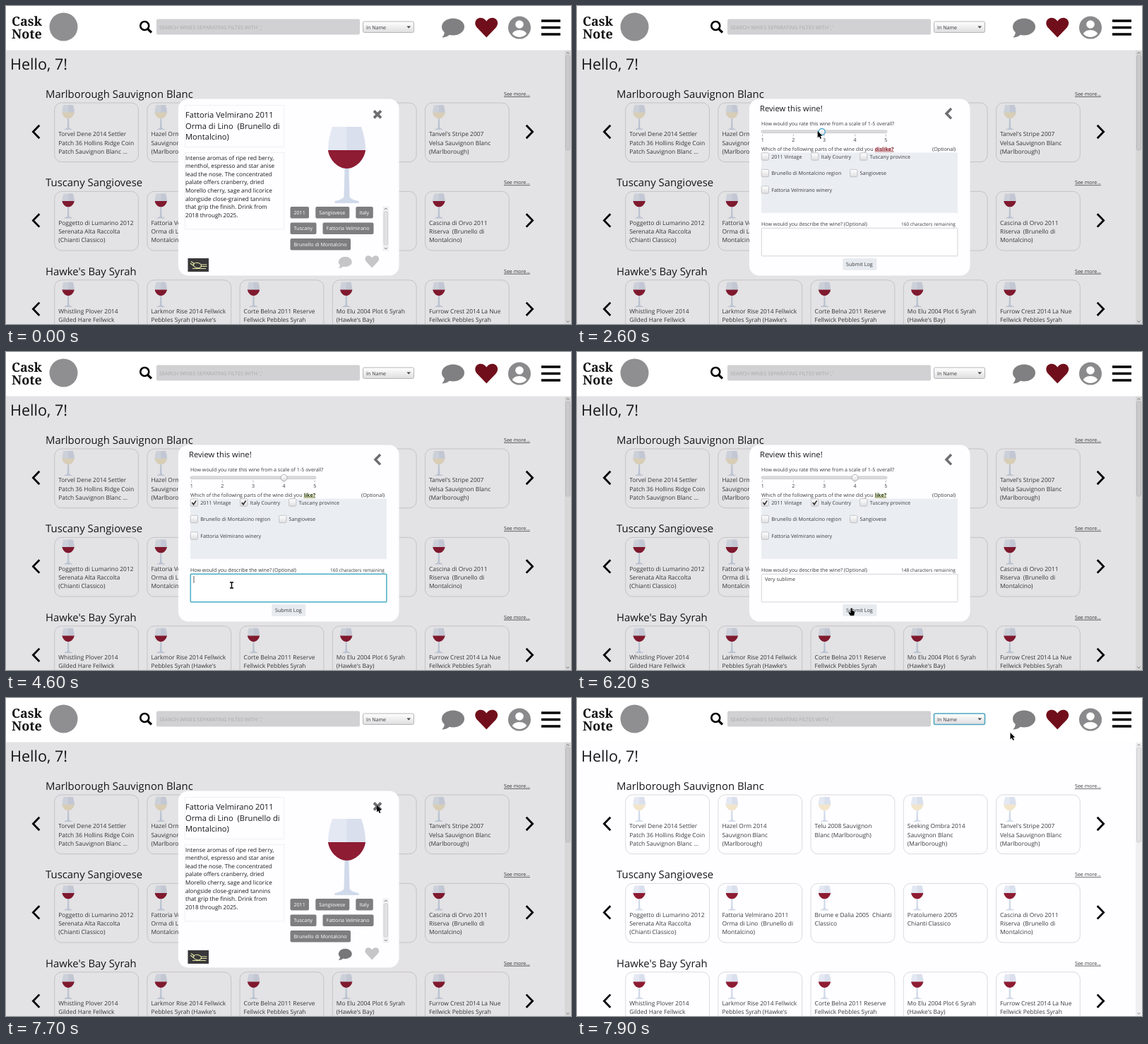
These frames come from a looping animation (800x450 px, 8000 ms). An HTML page:

```html
<!DOCTYPE html>
<html lang="en">
<head>
<meta charset="utf-8">
<title>Wine review</title>
<style>
html, body { margin: 0; width: 100%; height: 100%; overflow: hidden; background: #fefdff; }
svg { display: block; width: 800px; height: 450px; }
text { font-family: "Open Sans", "Noto Sans", sans-serif; fill: #3a3a3d; white-space: pre; text-rendering: geometricPrecision; }
.dark { fill: #18181a; }
.line { fill: none; stroke-linejoin: miter; }
</style>
</head>
<body>
<svg id="stage" viewBox="0 0 800 450"></svg>
<script>
const LOOP = 8000, STEP = 100;
const OPEN = 1000, SUBMIT = 6400, CLOSE = 7800;
const NOTE = 'Very sublime';

const text = (x, y, size, str, attrs = '') =>
  `<text x="${x}" y="${y}" font-size="${size}" ${attrs}>${str}</text>`;
const lines = (x, y, size, gap, list, attrs) =>
  list.map((s, i) => text(x, y + i * gap, size, s, attrs)).join('');
const rect = (x, y, w, h, fill, attrs = '') =>
  `<rect x="${x}" y="${y}" width="${w}" height="${h}" fill="${fill}" ${attrs}/>`;
const line = (d, stroke, width, attrs = '') =>
  `<path class="line" d="${d}" stroke="${stroke}" stroke-width="${width}" ${attrs}/>`;
const shape = (d, fill, attrs = '') => `<path d="${d}" fill="${fill}" ${attrs}/>`;
const use = (id, x, y, scale = 1, attrs = '') =>
  `<use href="#${id}" transform="translate(${x} ${y}) scale(${scale})" ${attrs}/>`;
const DARK = 'class="dark"';

// Glass origin is the middle of its rim.
const glass = (id, wine) => `<g id="${id}">
  ${shape('M-20.5 0H20.5Q26.5 18 26.5 33C25 46 13 59 0 59C-13 59 -25 46 -26.5 33Q-26.5 18 -20.5 0Z', '#e3e8f3')}
  ${shape('M0 0H20.5Q26.5 18 26.5 33H0Z', '#d9dfec')}
  ${shape('M-26.5 33H26.5C25 46 13 59 0 59C-13 59 -25 46 -26.5 33Z', wine)}
  ${shape('M-3 59H3L4 99Q6 103 17 105V108H-17V105Q-6 103 -4 99Z', '#d0daea')}</g>`;

const defs = `<defs>
  <linearGradient id="button" x2="0" y2="1"><stop stop-color="#fff"/><stop offset="1" stop-color="#dedee0"/></linearGradient>
  <clipPath id="disc"><circle cx="727" cy="31" r="13"/></clipPath>
  ${glass('white', '#f2e5ca')}${glass('red', '#8e1c33')}
  <g id="chat"><ellipse cy="-1" rx="16" ry="12"/><path d="M-12 5Q-12 11 -16 14Q-8 14 -4 9Z"/></g>
  <path id="heart" d="M0 14L-13 0.5C-22 -10 -8 -20 0 -9C8 -20 22 -10 13 0.5Z"/>
  <path id="arrow" d="M0 0V9.5L2.2 7.5L3.8 11L5.4 10.3L3.8 6.8H6.7Z"/>
  <path id="beam" class="line" d="M-2.5 -4H2.5M0 -4V4M-2.5 4H2.5" stroke="#000" stroke-width="1.4"/>
  <path id="hand" d="M-1 -5Q0 -6.5 1 -5V-2L4 -1Q5 -.5 4.6 1L3.6 5H-1.5L-4 1Q-4 -.5 -2.6 .3L-1 1.5Z"/>
</defs>`;

const header = rect(0, 0, 800, 62.5, '#fff') +
  lines(8, 27.5, 18, 18.5, ['Cask', 'Note'], 'style="font-family:\'Noto Serif\',serif;font-weight:900;fill:#111"') +
  '<circle cx="81.5" cy="29.5" r="20" fill="#8f8f91"/>' +
  '<circle cx="196.3" cy="28" r="6" fill="none" stroke="#000" stroke-width="2.6"/>' + line('M200.5 32.3L206 37.5', '#000', 3.2) +
  rect(213, 18.5, 288, 22, '#d1d0d2', 'rx="2"') +
  text(217, 32.5, 7.3, "SEARCH WINES SEPARATING FILTES WITH ','", 'style="fill:#aaa9ab"') +
  rect(505.5, 22, 72, 15.5, 'url(#button)', 'id="combo" rx="2"') +
  text(510, 32.5, 7.1, 'In Name') + shape('M567.5 28.5H573L570.2 31.5Z', '#444') +
  use('chat', 633, 30.4, 1, 'fill="#808082"') +
  use('heart', 680.3, 30.6, 1, 'fill="#700f1b"') +
  '<circle cx="727" cy="30.6" r="16" fill="#8a8a8c"/><g clip-path="url(#disc)" fill="#fff">' +
  '<circle cx="727" cy="26" r="5.8"/><ellipse cx="727" cy="42" rx="11" ry="8"/></g>' +
  line('M758 21H785M758 30.5H785M758 40H785', '#000', 3.7);

const rows = [
  ['Marlborough Sauvignon Blanc', 'white', [
    ['Torvel Dene 2014 Settler', 'Patch 36 Hollins Ridge Coin', 'Patch Sauvignon Blanc ...'],
    ['Hazel Orm 2014', 'Sauvignon Blanc', '(Marlborough)'],
    ['Telu 2008 Sauvignon', 'Blanc (Marlborough)'],
    ['Seeking Ombra 2014', 'Sauvignon Blanc', '(Marlborough)'],
    ["Tanvel's Stripe 2007", 'Velsa Sauvignon Blanc', '(Marlborough)']]],
  ['Tuscany Sangiovese', 'red', [
    ['Poggetto di Lumarino 2012', 'Serenata Alta Raccolta', '(Chianti Classico)'],
    ['Fattoria Velmirano 2011', 'Orma di Lino  (Brunello di', 'Montalcino)'],
    ['Brume e Dalia 2005  Chianti', 'Classico'],
    ['Pratolumero 2005', 'Chianti Classico'],
    ['Cascina di Orvo 2011', 'Riserva  (Brunello di', 'Montalcino)']]],
  ["Hawke's Bay Syrah", 'red', [
    ['Whistling Plover 2014', 'Gilded Hare Fellwick'],
    ['Larkmor Rise 2014 Fellwick', "Pebbles Syrah (Hawke's"],
    ['Corte Belna 2011 Reserve', 'Fellwick Pebbles Syrah'],
    ['Mo Elu 2004 Plot 6 Syrah', "(Hawke's Bay)"],
    ['Furrow Crest 2014 La Nue', 'Fellwick Pebbles Syrah']]]];

const card = (wine, list, i) => {
  const x = 68.7 + i * 131.2;
  return rect(x, 137, 118.8, 83.7, '#fefdff', 'rx="10" stroke="#dad9dd"') +
    use(wine, x + 19.4, 140, .325) + lines(x + 5.5, 184.2, 8.45, 12.4, list);
};
const section = ([title, wine, cards], i) => `<g transform="translate(0 ${i * 125.4})">` +
  text(56, 130, 14.9, title, DARK) +
  text(705, 127, 7.1, 'See more...', 'text-decoration="underline"') +
  line('M47.3 168.8L38.4 178L47.3 187.2M736.7 168.8L745.6 178L736.7 187.2', '#000', 2.8) +
  cards.map((c, j) => card(wine, c, j)).join('') + '</g>';

const scrollbar = (x, y, w, h, top, len) => rect(x, y, w, h, '#f0f0f2') +
  rect(x + 1.5, top, w - 3, len, '#e2e2e5', 'rx="2" stroke="#c6c6c9" stroke-width=".7"') +
  line(`M${x + w / 2 - 2} ${y + 4.5}l2 -2l2 2M${x + w / 2 - 2} ${y + h - 4.5}l2 2l2 -2`, '#777', 1);

const page = rect(0, 62, 800, 388, '#fefdff') + text(6, 90.3, 21.6, 'Hello, 7!', DARK) +
  rows.map(section).join('') + scrollbar(791, 63, 9, 387, 70, 134);

const tag = ([x, y, w, label]) => rect(x, y, w, 16.5, '#7e7d7f', 'rx="2"') +
  text(x + 5, y + 10.8, 7.1, label, 'style="fill:#fff"');

const detail = rect(253.5, 140.5, 140, 59, 'none', 'stroke="#f0eff2"') +
  lines(254, 157.8, 11.2, 15.7, ['Fattoria Velmirano 2011', 'Orma di Lino  (Brunello di', 'Montalcino)'], DARK) +
  rect(253.5, 207.5, 140, 108.5, 'none', 'stroke="#f0eff2"') +
  lines(254, 217.5, 8.2, 11.65, ['Intense aromas of ripe red berry,', 'menthol, espresso and star anise',
    'lead the nose. The concentrated', 'palate offers cranberry, dried', 'Morello cherry, sage and licorice',
    'alongside close-grained tannins', 'that grip the finish. Drink from', '2018 through 2025.'], DARK) +
  line('M521 148.3L531 158.3M531 148.3L521 158.3', '#6e6d6f', 3.8) +
  use('red', 482.5, 171) +
  [[402.5, 284, 26.5, '2011'], [438.3, 284, 48, 'Sangiovese'], [495.3, 284, 24.5, 'Italy'],
   [402.5, 306.5, 37, 'Tuscany'], [448.5, 306.5, 72, 'Fattoria Velmirano'],
   [402.5, 329, 85.5, 'Brunello di Montalcino']].map(tag).join('') +
  scrollbar(533.5, 283.5, 8.5, 63, 291, 47) +
  rect(257.5, 357, 29.5, 19, '#38383a') +
  line('M262 361.5L267 365M261 364L265.5 367.5M276 366H284.5M276 368.5H284.5M264 371.5H283', '#e4e6a6', 1.1) +
  '<ellipse cx="271" cy="367" rx="5.6" ry="3.6" fill="none" stroke="#e4e6a6" stroke-width="1.2" transform="rotate(12 271 367)"/>' +
  use('chat', 480.3, 362.6, .6, 'id="reviewed"') + use('heart', 518.3, 361.8, .62, 'fill="#c6c5c8"');

const check = ([x, y, label], i) => rect(x - 5, y - 5.2, 10.3, 10.4, 'url(#button)', 'rx="1.5" stroke="#b8b8bb" stroke-width=".8"') +
  (i < 2 ? line(`M${x - 2.8} ${y}l2.2 2.8l3.6 -5.4`, '#333', 1.7, `id="tick${i}"`) : '') + text(x + 9, y + 2.6, 7.2, label);

const tickX = v => 262.7 + (v - 1) * 43.65;
const review = text(259, 148.5, 11.2, 'Review this wine!', DARK) +
  line('M530 145L523 152.2L530 159.4', '#6e6d6f', 3.5) +
  text(261, 168.5, 7.15, 'How would you rate this wine from a scale of 1-5 overall?') +
  rect(261, 176, 178, 3.6, '#dcdcde', 'rx="1.8" stroke="#b9b9bc" stroke-width=".7"') +
  [1, 2, 3, 4, 5].map(v => line(`M${tickX(v)} 181.5v3`, '#aaa', .8)).join('') +
  '<g id="scale" text-anchor="middle">' + [1, 2, 3, 4, 5].map(v => text(tickX(v), 192, 7.1, v)).join('') + '</g>' +
  '<circle id="knob" cy="178" r="4.6" fill="url(#button)"/>' +
  text(261, 204.5, 7.15, 'Which of the following parts of the wine did you') +
  text(421.7, 204.5, 7.2, '', 'id="mood" font-weight="700" text-decoration="underline"') +
  text(503, 204.5, 7.2, '(Optional)') +
  rect(261, 207.5, 278, 85.3, '#eaeef3') +
  [[266.2, 213, '2011 Vintage'], [336.6, 213, 'Italy Country'], [405.6, 213, 'Tuscany province'],
   [266.2, 236.5, 'Brunello di Montalcino region'], [391.6, 236.5, 'Sangiovese'],
   [266.2, 260, 'Fattoria Velmirano winery']].map(check).join('') +
  text(261, 310.5, 7.15, 'How would you describe the wine? (Optional)') +
  text(459, 310.5, 6.5, '', 'id="count"') +
  rect(261.3, 314.3, 277.6, 39.5, '#fff', 'id="area" rx="1"') +
  text(266, 323.7, 7.15, '', 'id="note"') + line('M0 317v10', '#333', .8, 'id="caret"') +
  rect(376.3, 357, 48, 16.7, '#e7ebf0', 'rx="1.5"') + text(381, 368, 7.2, 'Submit Log');

const stage = document.getElementById('stage');
stage.innerHTML = defs + page + header + '<g id="modal">' + rect(0, 62.5, 800, 387.5, '#000', 'opacity=".105"') +
  rect(244, 131.5, 312.5, 250, '#fefdff', 'rx="14"') + `<g id="detail">${detail}</g><g id="review">${review}</g></g>` +
  use('arrow', 0, 0, 1, 'id="cursor"');

const $ = id => document.getElementById(id);
const set = (id, attrs) => Object.entries(attrs).forEach(([k, v]) => $(id).setAttribute(k, v));
const show = (id, on) => { $(id).style.display = on ? '' : 'none'; };

// Eases through [time, ...values] keys.
function follow(keys, t) {
  const i = keys.findIndex(k => k[0] > t);
  if (i < 1) return (i ? keys[keys.length - 1] : keys[0]).slice(1);
  const a = keys[i - 1], b = keys[i], u = (t - a[0]) / (b[0] - a[0]), e = u * u * (3 - 2 * u);
  return a.slice(1).map((v, j) => v + (b[j + 1] - v) * e);
}
const cursorKeys = [[300, 545, 430], [800, 477, 361], [1100, 472, 364], [1500, 472, 364], [2200, 344, 177],
  [2600, 340.7, 177], [2800, 331, 177], [3300, 387.5, 177], [3600, 266, 212], [3800, 266, 212], [4000, 337, 212],
  [4100, 337, 212], [4400, 319.5, 330], [5700, 319.5, 330], [6200, 388.5, 368], [6500, 388.5, 365],
  [7500, 525, 152], [7700, 525, 152], [7900, 613.5, 49]];
const knobKeys = [[2200, 349.8], [2600, 346.7], [2800, 337], [3300, 393.5]];

function draw(t) {
  const reviewing = t >= OPEN && t < SUBMIT;
  show('modal', t < CLOSE);
  show('review', reviewing);
  show('detail', !reviewing);
  set('reviewed', { fill: t < SUBMIT ? '#c6c5c8' : '#777679' });
  set('combo', t < CLOSE ? { stroke: '#b5b5b8', 'stroke-width': 1 } : { stroke: '#4fa6c2', 'stroke-width': 1.6 });

  const [knob] = follow(knobKeys, t);
  const sliding = t < 3700, likes = knob > 349;
  set('knob', { cx: knob, stroke: sliding ? '#52a9cb' : '#aaaaad', 'stroke-width': sliding ? 1.5 : .9 });
  show('scale', t >= 1200);
  $('mood').textContent = likes ? 'like?' : 'dislike?';
  $('mood').style.cssText = likes ? 'fill:#26401c;text-shadow:0 1px 2px #f0e2a4' : 'fill:#87202c;text-shadow:0 1px 2px #ecc9c9';
  show('tick0', t >= 3700);
  show('tick1', t >= 4100);

  const typed = Math.max(0, Math.min(NOTE.length, Math.floor((t - 4700) / 85)));
  const focus = t >= 4500 && t < 6100;
  $('note').textContent = NOTE.slice(0, typed);
  $('count').textContent = `${160 - typed} characters remaining`;
  set('area', focus ? { stroke: '#48aec6', 'stroke-width': 1.5 } : { stroke: '#cfced2', 'stroke-width': .9 });
  show('caret', focus);
  set('caret', { transform: `translate(${266 + (typed ? $('note').getComputedTextLength() : 0)} 0)` });

  const [x, y] = follow(cursorKeys, t);
  const overArea = reviewing && x > 261 && x < 539 && y > 314 && y < 354;
  const overButton = reviewing && x > 376 && x < 425 && y > 357 && y < 374;
  show('cursor', t >= 300);
  set('cursor', { href: overArea ? '#beam' : overButton ? '#hand' : '#arrow', transform: `translate(${x} ${y})` });
}

const start = performance.now();
(function tick() {
  const t = (performance.now() - start) % LOOP;
  draw(Math.floor(t / STEP) * STEP);
  requestAnimationFrame(tick);
})();
</script>
</body>
</html>
```
